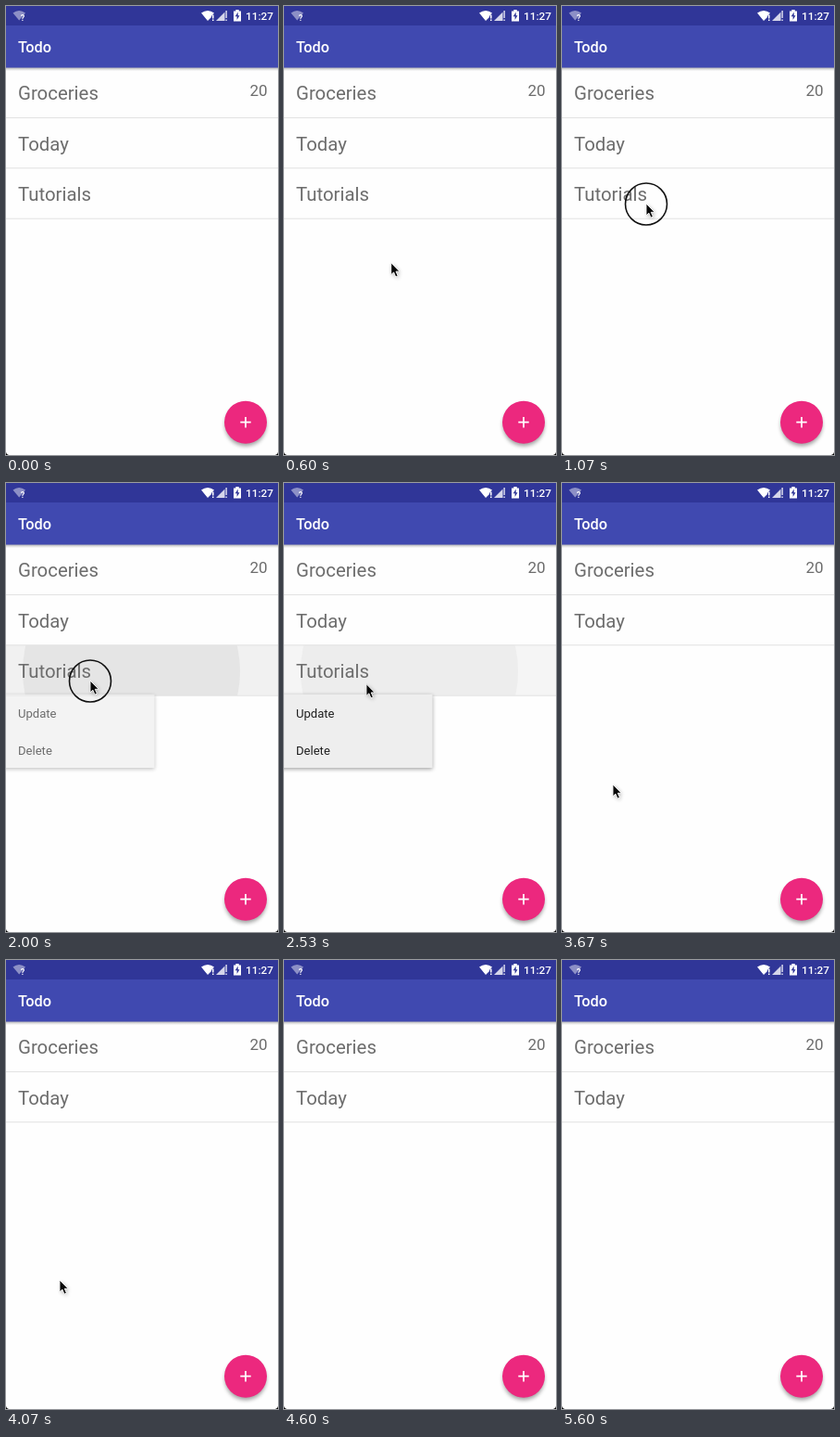
Animation, 294 px wide and 484 px high, one loop 5.74 s. Source, as an HTML page:

```html
<!DOCTYPE html>
<html lang="en">
<head>
<meta charset="utf-8">
<title>Todo list</title>
<style>
  html, body { margin: 0; width: 100%; height: 100%; overflow: hidden; background: #fff; }
  svg { display: block; width: 294px; height: 484px; font-family: Roboto, sans-serif; }
  .row text { font-size: 20.4px; fill: #6d6d6d; }
  .row path { stroke: #e2e2e2; }
  #menu text { font-size: 13.07px; fill: #202020; }
</style>
</head>
<body>
<svg viewBox="0 0 294 484">
  <defs>
    <linearGradient id="under" x2="0" y2="1">
      <stop stop-color="#000" stop-opacity=".3"/>
      <stop offset="1" stop-color="#000" stop-opacity="0"/>
    </linearGradient>
    <filter id="soft" x="-30%" y="-30%" width="160%" height="160%"><feGaussianBlur stdDeviation="2"/></filter>
    <clipPath id="rowClip"><rect y="175" width="294" height="54"/></clipPath>
  </defs>
  <rect width="294" height="484" fill="#fefefe"/>

  <g id="press">
    <rect y="175" width="294" height="54" fill="#f1f1f1"/>
    <circle id="ripple" cy="203" fill="#e5e5e5" clip-path="url(#rowClip)"/>
  </g>
  <g class="row"><text x="13" y="101">Groceries</text><path d="M0 120.5H294"/></g>
  <g class="row"><text x="13" y="155.5">Today</text><path d="M0 174.8H294"/></g>
  <g class="row" id="last"><text x="13" y="210">Tutorials</text><path d="M0 229.2H294"/></g>
  <text x="282.5" y="97" font-size="17" fill="#6d6d6d" text-anchor="end">20</text>

  <rect y="66" width="294" height="4" fill="url(#under)"/>
  <rect width="294" height="66.5" fill="#4049b0"/>
  <rect width="294" height="21" fill="#303698"/>
  <text x="13" y="49.5" font-size="16.3" font-weight="500" fill="#fff">Todo</text>

  <g fill="#fff">
    <path d="M7.5 7.5Q14 2.500 21 7.500L14.200 15.500Z" opacity=".45"/>
    <text x="15.800" y="15.500" font-size="9" font-weight="700">?</text>
    <path d="M211 7.500Q218 2.500 225 7.500L222 11V12L218 16Z"/>
    <path d="M223 9.500h1.500v4h-1.500zM223 14.500h1.500v1.500h-1.500z"/>
    <path d="M227 16L236.500 6.500V16Z" opacity=".8"/>
    <path d="M237.500 5h1.200v8h-1.200zM237.500 14.500h1.200v1.500h-1.200z"/>
    <path d="M246 5.500H248.300V4H251.700V5.500H254V16.500H246Z"/>
    <path d="M250.700 6.500L247.700 11.300H249.600V15L252.500 10.200H250.700Z" fill="#303698"/>
    <text x="259" y="15" font-size="11.8" font-weight="500">11:27</text>
  </g>

  <circle cx="259" cy="452" r="22.500" opacity=".36" filter="url(#soft)"/>
  <circle cx="259" cy="448.700" r="23" fill="#ec287e"/>
  <path d="M253.300 448.700h11.400M259 443v11.400" stroke="#fff" stroke-width="1.700"/>

  <g id="menu">
    <rect y="229" x="-4" width="164.500" height="79.500" opacity=".36" filter="url(#soft)"/>
    <rect y="227.800" width="160.500" height="79.200" fill="#eee"/>
    <rect id="chosen" y="268" width="160.500" height="39" fill="#e5e5e5"/>
    <text x="13" y="253">Update</text>
    <text x="13" y="292.500">Delete</text>
  </g>

  <g id="pointer">
    <circle id="ring" cy=".5" r="22.500" fill="none" stroke="#111" stroke-width="1.600"/>
    <path d="M0 0V12.800L2.900 10.200L5 15.200L7.400 14.100L5.300 9.300H9.200Z" transform="translate(1 1.500)" opacity=".3" filter="url(#soft)"/>
    <path d="M0 0V12.800L2.900 10.200L5 15.200L7.400 14.100L5.300 9.300H9.200Z" fill="#080808" stroke="#fff" stroke-width=".9"/>
  </g>
  <path d="M0 481Q.3 483.700 3 484H0ZM294 481Q293.700 483.700 291 484H294Z"/>
</svg>
<script>
const LOOP = 5740, STEP = 1000 / 15;
const el = id => document.getElementById(id);
const show = (id, opacity) => el(id).setAttribute("opacity", opacity);
const mix = (a, b, p) => a + (b - a) * p;
const part = (t, from, to) => Math.min(1, Math.max(0, (t - from) / (to - from)));
const ease = p => p * p * (3 - 2 * p);

// time, x, y
const path = [
  [330, 146, 446], [670, 112, 256], [900, 91, 213], [2470, 91, 213],
  [2960, 46.5, 292], [3400, 46.5, 292], [3670, 55, 325],
  [4070, 58, 345], [4400, 66, 488]
];

function movePointer(t) {
  const end = path.findIndex(p => p[0] > t);
  const visible = end > 0;
  show("pointer", visible ? 1 : 0);
  if (!visible) return;
  const [a, b] = [path[end - 1], path[end]];
  const p = ease(part(t, a[0], b[0]));
  el("pointer").setAttribute("transform", `translate(${mix(a[1], b[1], p)} ${mix(a[2], b[2], p)})`);
}

function draw(t) {
  movePointer(t);
  show("ring", t >= 990 && t < 2470 ? 1 : 0);

  const grow = part(t, 1200, 1930);
  el("ripple").setAttribute("cx", mix(91, 135.5, grow));
  el("ripple").setAttribute("r", mix(8, 117.5, grow));
  show("press", part(t, 1130, 1300) * (1 - part(t, 2450, 2700)));

  show("menu", part(t, 1870, 2070) * (1 - part(t, 3140, 3320)));
  show("chosen", t >= 3100 ? 1 : 0);
  show("last", t < 3250 ? 1 : 0);
}

function tick(now) {
  const t = now % LOOP;
  draw(Math.floor((t + 3.5) / STEP) * STEP);
  requestAnimationFrame(tick);
}
draw(0);
requestAnimationFrame(tick);
</script>
</body>
</html>
```
